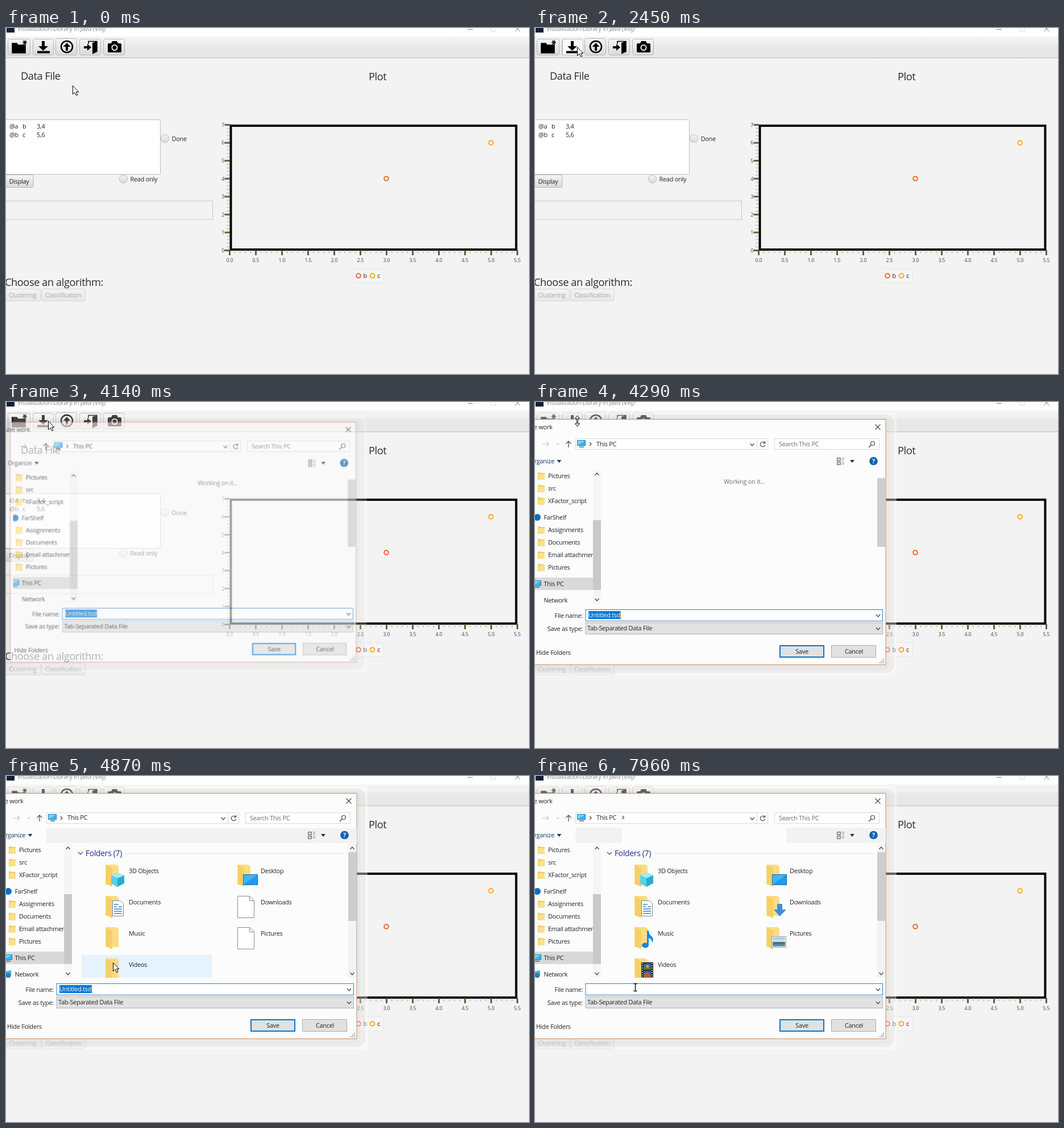
These frames come from a looping animation (920 px wide and 609 px high, 8 s). An HTML page:

```html
<!DOCTYPE html>
<html lang="en">
<head>
<meta charset="utf-8">
<title>Save dialog</title>
<style>
  html, body { margin: 0; width: 100%; height: 100%; overflow: hidden; background: #f3f3f3; }
  svg { display: block; }
  text { font: 10.9px "Open Sans", "Noto Sans", sans-serif; letter-spacing: -.023em; fill: #222; white-space: pre; }
  .big { font-size: 18.2px; fill: #2b2b2b; }
  .tick { font-size: 8.8px; fill: #444; }
  .off { fill: #a5a5a5; }
  .end { text-anchor: end; }
  .mid { text-anchor: middle; }
  .line { fill: none; stroke: #444; stroke-width: 1.2; }
  .btn { fill: url(#face); stroke: #b6b6b6; }
  #dialog { transform-origin: 560px 248px; animation: open 8s step-end infinite; }
  #arrow { animation: pointer 8s step-end infinite; }
  @keyframes open {
    0% { opacity: 0; transform: scale(.978); }
    51.75% { opacity: .65; transform: scale(.978); }
    53.625% { opacity: 1; transform: none; }
  }
</style>
</head>
<body>
<svg width="920" height="609" viewBox="0 0 920 609">
  <defs>
    <linearGradient id="face" x2="0" y2="1"><stop stop-color="#f5f5f5"/><stop offset="1" stop-color="#dadada"/></linearGradient>
    <linearGradient id="bar" x2="0" y2="1"><stop stop-color="#f4f4f4"/><stop offset=".35" stop-color="#f0f0f0"/><stop offset=".42" stop-color="#e9e9e9"/><stop offset="1" stop-color="#e7e7e7"/></linearGradient>
    <linearGradient id="scene" x2="0" y2="1"><stop stop-color="#8cc4ee"/><stop offset=".45" stop-color="#d8ecf5"/><stop offset=".55" stop-color="#3d6a62"/><stop offset="1" stop-color="#5f9fc4"/></linearGradient>
    <clipPath id="list"><path d="M117 119h485v236H117z"/></clipPath>
    <clipPath id="tree"><path d="M0 119h102v236H0z"/></clipPath>
    <g id="page"><path d="M.5 .5h21l8 8v30H.5z" fill="#fff" stroke="#8c8c8c"/><path d="M21.500 .5v8h8" fill="none" stroke="#8c8c8c"/></g>
    <g id="folder"><path d="M0 0h19l4 3v32H0z" fill="#fbdc82"/><path d="M1 0l11 6v33L1 34z" fill="#f5cf67"/></g>
    <g id="small"><path d="M0-6h5l1 1h6V7H0z" fill="#f3cb61"/><path d="M1-3h11V7H1z" fill="#fbdf8d"/></g>
    <g id="pc"><path d="M.5 .5h14v9H.5z" fill="#35b4f0" stroke="#1c7bb5"/><path d="M1 9L14 1H1z" fill="#7fd3f8"/><path d="M4 12h8" stroke="#6c8090" stroke-width="2"/></g>
    <path id="down" class="line" d="M-3.500-2L0 2l3.500-4"/>
    <path id="tri" d="M-4-2h8L0 3z" fill="#123a63"/>
  </defs>

  <rect width="920" height="609" fill="#f3f3f3"/>
  <rect width="920" height="15" fill="#fff"/>
  <rect x="1" width="14" height="8" fill="#10203a"/>
  <text x="20" y="5" style="fill:#888">Visualization Library in Java (Vilij)</text>
  <path d="M812 2.500h9M895.500-3l9 9m0-9l-9 9" stroke="#777" fill="none"/>
  <path d="M853.500-3v8.500h8V-3" stroke="#ddd" fill="none"/>
  <rect y="15" width="920" height="37" fill="url(#bar)"/>
  <path d="M0 52.500h920" stroke="#b9b9b9"/>

  <g id="tools"></g>
  <rect x="48.500" y="19.500" width="36" height="28" rx="3" fill="#f9f9f9" stroke="#c2c2c2" data-on="710 1000 2450 3470"/>
  <rect x="48.500" y="19.500" width="36" height="28" rx="3" fill="#d9d9d9" stroke="#aaa" data-on="3470 4000"/>
  <path d="M11 27h8l2 3h13v14H11zM31 22l4 7m0-7l-4 7m-2-3.500h8" stroke="#000" stroke-width="1.600"/>
  <path d="M63 23h5v9h6l-8.500 8L57 32h6zM55 40.500h22v4H55z"/>
  <circle cx="107" cy="33" r="10" fill="none" stroke="#000" stroke-width="2.600"/>
  <path d="M107 26l6.500 7H109v7h-4v-7h-4.500z"/>
  <path d="M145 28v-4.500h15v18h-6" fill="none" stroke="#000" stroke-width="1.600"/>
  <path d="M152 26l8-3v19l-8 4zM137 32h6v-4l7 6-7 6v-4h-6z"/>
  <path d="M181 27h4l2-4h8l2 4h4q2 0 2 2v12q0 2-2 2h-20q-2 0-2-2V29q0-2 2-2z"/>
  <circle cx="191" cy="34.500" r="4.600" fill="none" stroke="#fff" stroke-width="1.800"/>

  <text class="big" x="26" y="91">Data File</text>
  <text class="big" x="638" y="92">Plot</text>
  <rect x="-3" y="161.500" width="274.500" height="96" rx="2" fill="#fff" stroke="#bcbcbc"/>
  <text y="177"><tspan x="6">@a</tspan><tspan x="29">b</tspan><tspan x="54">3,4</tspan></text>
  <text y="192"><tspan x="6">@b</tspan><tspan x="29">c</tspan><tspan x="54">5,6</tspan></text>
  <circle class="btn" cx="279.500" cy="194.500" r="7"/><text x="291.500" y="199">Done</text>
  <circle class="btn" cx="206.500" cy="266" r="7"/><text x="218.500" y="270">Read only</text>
  <rect class="btn" x="-5" y="258.500" width="53" height="22" rx="3"/><text x="5.500" y="274">Display</text>
  <rect x="-3" y="304.500" width="366.500" height="32.500" fill="none" stroke="#c6c6c6"/>
  <text class="big" x="-2" y="454">Choose an algorithm:</text>
  <g opacity=".45"><rect class="btn" x="-5" y="459.500" width="66" height="21" rx="3"/><rect class="btn" x="62.500" y="459.500" width="77" height="21" rx="3"/></g>
  <text class="off" x="5" y="474">Clustering</text><text class="off" x="69" y="474">Classification</text>

  <rect x="395.500" y="172" width="502" height="218" fill="none" stroke="#000" stroke-width="4"/>
  <g id="axes"></g>
  <rect x="610.500" y="423.500" width="54" height="25" rx="3" fill="#f5f5f5" stroke="#e6e6e6"/>
  <g fill="#fff" stroke-width="2"><g stroke="#f3622d"><circle cx="669" cy="265" r="3.800"/><circle cx="620" cy="436" r="3.800"/></g><g stroke="#fba71b"><circle cx="853" cy="202" r="3.800"/><circle cx="644.500" cy="436" r="3.800"/></g></g>
  <text x="628.500" y="440">b</text><text x="653" y="440">c</text>

  <g id="dialog">
    <path d="M0 17.500h636v463.500H0z" fill="#fff" opacity=".4"/>
    <rect x="-30" y="22" width="662" height="455" rx="15" opacity=".045"/>
    <rect x="-30" y="26" width="653" height="446" rx="9" opacity=".025"/>
    <rect x="-5" y="30.500" width="622" height="432" fill="#fcfcfc" stroke="#cd8c61"/>
    <text class="end" x="30.500" y="48">Save work</text>
    <path class="line" d="M598.500 39.500l9 9m0-9l-9 9"/>
    <path class="line" style="stroke:#c6c6c6" d="M13 74h11m-4-4l4 4-4 4M37.500 73l2.500 2 2.500-2"/>
    <path class="line" d="M59 80V69m-4.500 4.500L59 69l4.500 4.500"/>
    <g fill="#f2f2f3">
      <path d="M71 92h546v26H71z" data-on="4720 4990"/>
      <path d="M71 91h82v27H71zM443 91h174v27H443z" data-on="4990"/>
    </g>
    <path d="M71.500 64.500h338v19h-338zM390.500 64.500v19M421.500 64.500h184v19h-184z" fill="#fff" stroke="#d9d9d9"/>
    <use href="#pc" x="74" y="67"/>
    <path class="line" d="M96 71l3 3-3 3"/>
    <path class="line" d="M153.500 70l3 3-3 3" data-on="4990"/>
    <text x="108" y="78" data-on="4140 4720">This PC</text><text x="108" y="77" data-on="4720">This PC</text>
    <use href="#down" x="382" y="75"/>
    <path class="line" d="M404 72a4.200 4.200 0 1 0 .5 4M404.500 69v3.500H401"/>
    <text x="429" y="78" style="fill:#6b6b6b">Search This PC</text>
    <circle class="line" cx="594" cy="73" r="3.500"/><path class="line" d="M591.500 75.500l-4.500 4.500"/>
    <text class="end" x="34" y="108" style="fill:#1a3561">Organize</text>
    <use href="#tri" x="42.500" y="104"/><use href="#tri" x="558" y="104"/>
    <path d="M531.500 98.500h6v5h-6zm0 7h6v5h-6z" fill="#bcd4e9" stroke="#666"/><path d="M540 99h4m-4 3h4m-4 4h4m-4 3h4" stroke="#777"/>
    <circle cx="595.500" cy="104" r="7.300" fill="#0c62b1"/><text class="mid" x="595.500" y="108" style="fill:#fff;font-weight:700">?</text>

    <g clip-path="url(#tree)">
      <path d="M0 309h102v22H0z" fill="#d9d9d9"/>
      <g id="places"></g>
      <circle cx="4" cy="203" r="6" fill="#0a6fc8"/>
      <use href="#pc" x="-4" y="314"/>
      <g data-on="4560"><path d="M-2 344l11-2v9l-11 2z" fill="#3bb3ec"/><circle cx="4" cy="351" r="4.500" fill="#3678b5"/></g>
    </g>
    <path d="M102 119h14v236h-14z" fill="#f5f5f5"/><path d="M102 208h14v123h-14z" fill="#c9c9c9"/>
    <use href="#down" x="109" y="348"/><use href="#down" transform="translate(109 127) scale(1 -1)"/>
    <path d="M602 119h14v236h-14z" fill="#f3f3f3" data-on="4720"/><path d="M602 134h14v121h-14z" fill="#cdcdcd"/>
    <g data-on="4720"><use href="#down" x="609" y="348"/><use href="#down" transform="translate(609 127) scale(1 -1)"/></g>

    <text x="332" y="144" style="fill:#6d6d6d" data-on="4140 4720">Working on it...</text>
    <g clip-path="url(#list)" data-on="4720">
      <path class="line" d="M127 134l4 4 4-4"/>
      <text x="140" y="140.500" style="fill:#1e3287;font-size:13.900px">Folders (7)</text>
      <path d="M210 136.500h385" stroke="#e2e2e2"/>
      <path d="M133 315h229v40H133z" fill="#e5f3ff" data-on="4720 5150"/>
      <g id="files"></g>
      <g data-on="4870">
        <path d="M196 170l12 5v14l-12 6-11-6v-14z" fill="#27aed0"/><path d="M196 170l12 5-12 5-11-5z" fill="#a5e9f4"/><path d="M185 175l11 5v15l-11-6z" fill="#5bcfe6"/>
        <path d="M417.500 173.500h25v18h-25z" fill="#1e9bf0" stroke="#1369ad"/><path d="M418 191l24-17h-24z" fill="#42b4f8"/>
        <path d="M187.500 219.500h14l5 5v22h-19z" fill="#fff" stroke="#7d8894"/><path d="M190 226h8m-8 4h5m-5 4h14m-14 4h14m-14 4h14M198 230h6" stroke="#3b7fc0" stroke-width="1.500"/>
      </g>
      <g data-on="4990">
        <path d="M426 225h9v10h7l-11.500 12L420 235h6z" fill="#3c8fe0"/>
        <ellipse cx="194" cy="298" rx="6" ry="4.500" fill="#1389e0"/><path d="M197 272h3q0 6 5 10 5 5 1 12 0-7-6-9v13h-3z" fill="#1389e0"/>
        <path d="M416.500 282.500h25v19h-25z" fill="#fff" stroke="#999"/><path d="M418 284h22v16h-22z" fill="url(#scene)"/>
        <path d="M187 328h21v27h-21z" fill="#25282e"/><path d="M191 330h13v11h-13zM191 343h13v12h-13z" fill="#2f63b8"/><path d="M191 337l5-4 4 5 4-2v5h-13z" fill="#587c2d"/><circle cx="198" cy="335" r="2.500" fill="#e5a52d"/><path d="M192 349l5-4 7 6v4h-12z" fill="#b5612c"/>
        <path d="M189 329v26m17-26v26" stroke="#ddd" stroke-width="1.500" stroke-dasharray="2 2"/>
      </g>
    </g>

    <text class="end" x="84" y="380">File name:</text><text class="end" x="84" y="402.500">Save as type:</text>
    <rect x="89" y="365.500" width="522.500" height="20" fill="#fff" stroke="#2b7fc9"/>
    <g data-on="4140 6310"><path d="M94 368h57v14H94z" fill="#0078d7"/><text x="94" y="379" style="fill:#fff">Untitled.tsd</text></g>
    <path d="M150.500 368v13" stroke="#ff8728" data-on="4290 4720 5150 5860"/>
    <path d="M94.500 368v13" stroke="#000" data-on="6310 6910 7370 7960"/>
    <rect x="89" y="388.500" width="522.500" height="20" fill="#e2e2e2" stroke="#b0b0b0"/>
    <text x="92" y="402">Tab-Separated Data File</text>
    <use href="#down" x="603.500" y="376"/><use href="#down" x="603.500" y="399"/>
    <text x="2" y="445">Hide Folders</text>
    <rect x="431" y="429" width="77" height="20" fill="#e1e1e1" stroke="#0078d7" stroke-width="2"/><text class="mid" x="469.500" y="443">Save</text>
    <rect x="521.500" y="428.500" width="78" height="21" fill="#e1e1e1" stroke="#adadad"/><text class="mid" x="561" y="443">Cancel</text>
    <path d="M612 453h2m-5 3h5m-8 3h8" stroke="#aaa" stroke-width="2" stroke-dasharray="2 1"/>
  </g>

  <g data-on="0 4290 4410 5150"><path id="arrow" d="M.5 .7v15l3.500-3.300 2.700 5.300 2.300-1-2.500-5.200h4.300z" fill="#fff" stroke="#000"/></g>
  <path d="M74.500 24l4 5h-3v9h3l-4 5-4-5h3v-9h-3z" fill="#fff" stroke="#000" data-on="4290 4410"/>
  <path id="beam" d="M181 365.500h2.500l1 1 1-1h2.500m-3.500 1v11m-3.500 1h2.500l1-1 1 1h2.500" fill="none" stroke="#000" stroke-width="1.300" data-on="5150 5290"/>
  <use href="#beamEnd" data-on="5290"/>
  <path d="M173.500 365.500h2l1 1 1-1h2m-3 1v11m-3 1h2l1-1 1 1h2" fill="none" stroke="#000" stroke-width="1.300" data-on="5290"/>
</svg>
<script>
  const LOOP = 8000;
  const put = (id, parts) => { document.getElementById(id).innerHTML = parts.join(''); };
  const steps = n => [...Array(n).keys()];
  const pct = ms => (ms / LOOP * 100).toFixed(4) + '%';

  put('tools', [[4, 39], [48, 36], [88, 37], [130, 37], [172, 37]].map(([x, w]) =>
    `<rect class="btn" x="${x - .5}" y="${x === 88 ? 18.5 : 19.5}" width="${w}" height="${x === 88 ? 29 : 28}" rx="3"/>`));

  // Axis ticks: five small divisions to each labelled one
  const tick = (d, major) => `<path d="${d}" stroke="${major ? '#5c6339' : '#a0a48a'}" stroke-width="${major ? 3 : 1}"/>`;
  const yTicks = steps(36).map(i => {
    const y = 391.5 - i * 6.314, major = i % 5 === 0;
    return tick(`M394 ${y}h${major ? -9.5 : -5.5}`, major) +
      (major ? `<text class="tick end" x="384" y="${y + 3.3}">${i / 5}</text>` : '');
  });
  const xTicks = steps(56).map(i => {
    const x = 393.5 + i * 9.2, major = i % 5 === 0;
    return tick(`M${x} 391v${major ? 9 : 5.5}`, major) +
      (major ? `<text class="tick mid" x="${x}" y="411.5">${(i / 10).toFixed(1)}</text>` : '');
  });
  put('axes', [...yTicks, ...xTicks]);

  const places = [['Pictures', 130], ['src', 152], ['XFactor_script', 174], ['FarShelf', 203, 1], ['Assignments', 225],
    ['Documents', 247], ['Email attachments', 269], ['Pictures', 291], ['This PC', 320, 1], ['Network', 349, 1]];
  put('places', places.map(([name, y, root]) =>
    `<text x="${root ? 15.5 : 23}" y="${y + 4}">${name}</text>` + (root ? '' : `<use href="#small" x="5" y="${y}"/>`)));

  // Each entry turns from a blank page into a folder at its own time
  const files = [['3D Objects', 4870], ['Desktop', 4870], ['Documents', 4870], ['Downloads', 4990],
    ['Music', 4870], ['Pictures', 4990], ['Videos', 4870]];
  put('files', files.map(([name, ready], i) => {
    const x = i % 2 ? 407 : 175, y = 156 + (i >> 1) * 55;
    return `<use href="#page" x="${x}" y="${y}" data-on="4720 ${ready}"/><use href="#folder" x="${x}" y="${y}" data-on="${ready}"/>
      <text x="${x + 41}" y="${y + 15}">${name}</text>`;
  }));

  // data-on lists the times at which a part is switched on, off, on, ...
  let css = '';
  document.querySelectorAll('[data-on]').forEach((el, i) => {
    const marks = el.dataset.on.split(' ').map((ms, k) => `${pct(ms)}{opacity:${1 - k % 2}}`).join('');
    css += `@keyframes on${i}{0%{opacity:0}${marks}}`;
    el.style.animation = `on${i} ${LOOP}ms step-end infinite`;
  });

  const path = [[0, 117, 101], [150, 112, 92], [300, 97, 72], [560, 76, 46], [710, 74, 43], [860, 73, 44], [1000, 113, 30],
    [1150, 155, 21], [1275, 103, 30], [1400, 111, 36], [2300, 83, 36], [2450, 74, 33], [4410, 130, 176], [4560, 210, 336], [4720, 188, 328]];
  css += `@keyframes pointer{${path.map(([ms, x, y]) => `${pct(ms)}{transform:translate(${x}px,${y}px)}`).join('')}}`;
  document.head.appendChild(document.createElement('style')).textContent = css;
</script>
</body>
</html>
```
